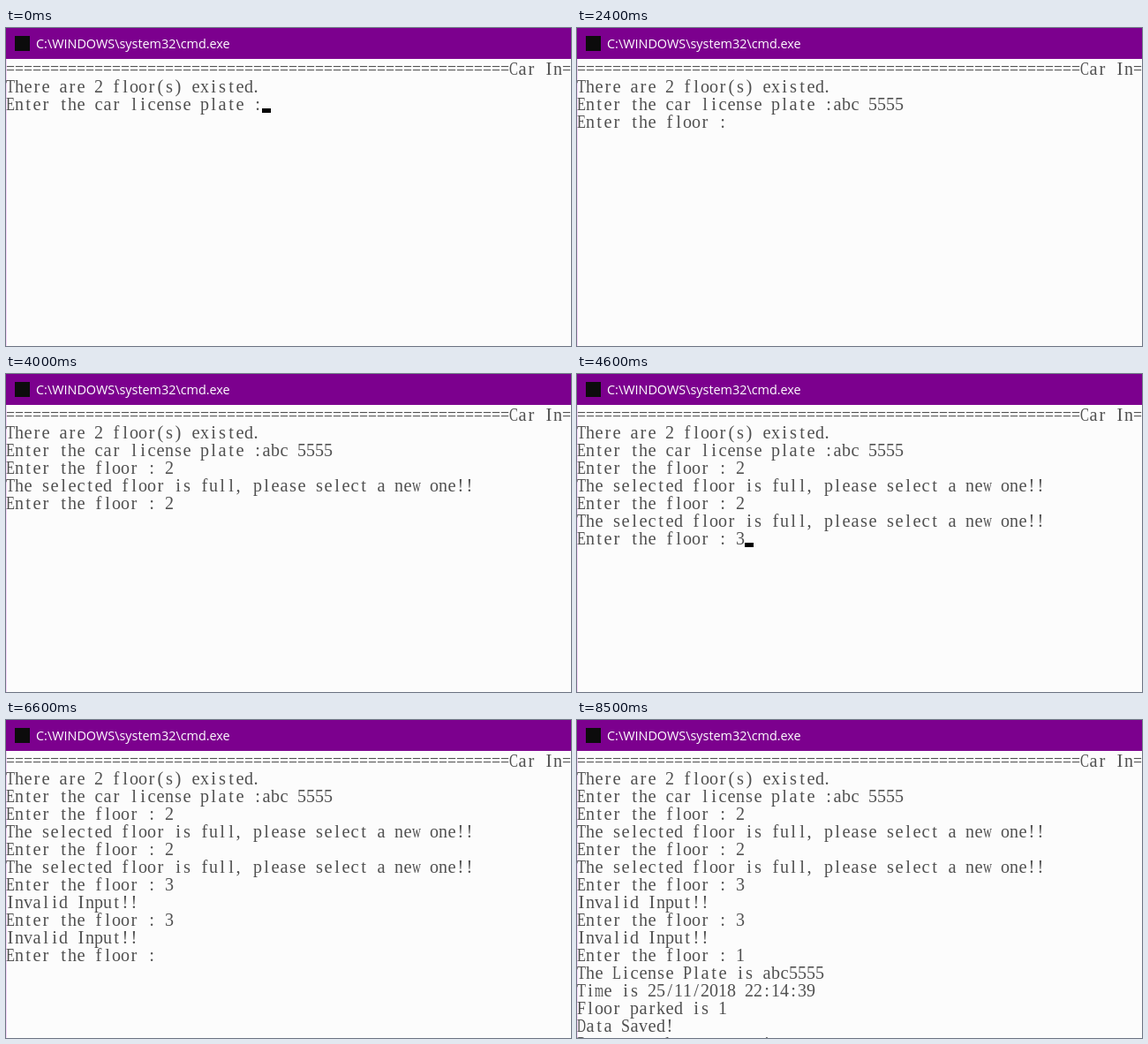
These frames come from a looping animation (640 px wide and 360 px high, 8.6 s). An HTML page with a canvas:

```html
<!DOCTYPE html>
<html lang="en">
<head>
<meta charset="utf-8">
<title>Console</title>
<style>
html, body { margin: 0; width: 100%; height: 100%; overflow: hidden; background: #fcfcfc; }
canvas { display: block; }
</style>
</head>
<body>
<canvas id="stage" width="640" height="360"></canvas>
<script>
const ctx = document.getElementById('stage').getContext('2d');
const LOOP = 8600;
const BAR = 35, TOP = 36, CELL = 10, ROW = 20;

const PROMPT = 'Enter the floor : ';
const FULL = '\nThe selected floor is full, please select a new one!!\n' + PROMPT;
const INVALID = '\nInvalid Input!!\n' + PROMPT;
const SAVED = '\nThe License Plate is abc5555\nTime is 25/11/2018 22:14:39' +
  '\nFloor parked is 1\nData Saved!\nPress any key to continue . . . ';

// [time, text added to the screen, cursor visible]
const events = [
  [0, '='.repeat(57) + 'Car In=\nThere are 2 floor(s) existed.\nEnter the car license plate :', true],
  [600, 'a', true], [700, 'b', true], [800, 'c', true], [900, '', false],
  [1100, '', true], [1200, ' ', true],
  [1500, '5', false], [1600, '', true], [1700, '5', true], [1800, '5', true], [1900, '5', true],
  [2000, '', false], [2300, '', true], [2400, '\n' + PROMPT, false], [2500, '', true],
  [2900, '2', true], [3200, FULL, true],
  [3900, '2', true], [4000, '', false], [4100, FULL, false], [4200, '', true],
  [4600, '3', true], [4900, '', false], [5000, INVALID, true],
  [5700, '3', false], [5900, INVALID, true], [6400, '', false],
  [6800, '1', false], [7000, SAVED, false]
];

function box(color, x, y, w, h) {
  ctx.fillStyle = color;
  ctx.fillRect(x, y, w, h);
}

// Stops and commas sit at the left of their cell; other glyphs are
// centred, and narrowed only when wider than the cell.
function glyph(ch, col, row) {
  const fit = Math.min(1, CELL / ctx.measureText(ch).width);
  const center = '.,'.includes(ch) ? 3 : CELL / 2;
  ctx.save();
  ctx.translate(col * CELL + center, TOP + row * ROW + 17);
  ctx.scale(fit, 1);
  ctx.fillText(ch, 0, 0);
  ctx.restore();
}

function drawTitle() {
  box('#7c008e', 0, 0, 640, BAR);
  box('#0c0c0c', 10, 9, 17, 17);
  ctx.fillStyle = '#fff';
  ctx.textAlign = 'left';
  ctx.font = '14.4px "Open Sans", "Noto Sans", sans-serif';
  ctx.fillText('C:\\WINDOWS\\system32\\cmd.exe', 34, 22.5);
}

function drawConsole(t) {
  let text = '', cursor = false;
  for (const [time, added, on] of events) {
    if (time > t) break;
    text += added;
    cursor = on;
  }
  ctx.fillStyle = '#505050';
  ctx.textAlign = 'center';
  ctx.font = '20.5px "Liberation Serif", serif';
  const lines = text.split('\n');
  lines.forEach((line, row) => {
    [...line].forEach((ch, col) => glyph(ch, col, row));
  });
  if (cursor) {
    const row = lines.length - 1;
    box('#000', lines[row].length * CELL, TOP + row * ROW + 15, CELL, 5);
  }
}

const start = performance.now();
function frame() {
  const t = (performance.now() - start) % LOOP;
  box('#fcfcfc', 0, 0, 640, 360);
  box('#f3d4f6', 0, BAR, 1, 360 - BAR);
  drawTitle();
  drawConsole(t);
  requestAnimationFrame(frame);
}
frame();
</script>
</body>
</html>
```
